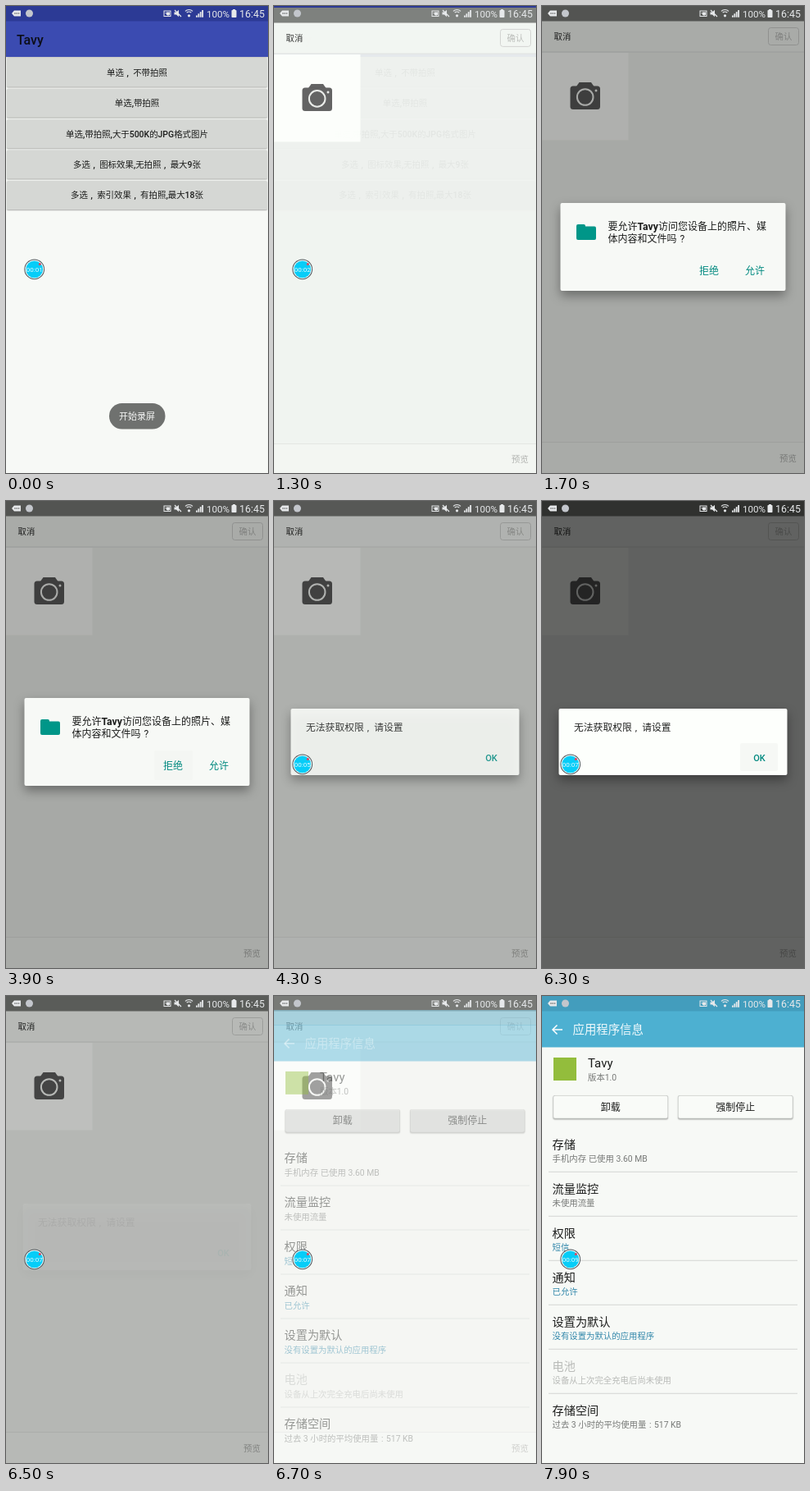
Recreate the animation shown at these times as an HTML page with a canvas. Size 320 by 569 pixels, loop 8000 ms.

```html
<!DOCTYPE html>
<html lang="zh-CN">
<head>
<meta charset="utf-8">
<style>
  html, body { margin: 0; width: 100%; height: 100%; overflow: hidden; background: #f7f9f6; }
  canvas { display: block; width: 320px; height: 569px; }
</style>
</head>
<body>
<canvas id="stage"></canvas>
<script>
const W = 320, H = 569, LOOP = 8000, STEP = 100;
const APP = 'Tavy', PAPER = '#f7f9f6', TEAL = '#00897f';
const canvas = document.getElementById('stage');
const scale = window.devicePixelRatio || 1;
canvas.width = W * scale;
canvas.height = H * scale;
const c = canvas.getContext('2d');
c.scale(scale, scale);

// Linear interpolation through [time, value] pairs.
function track(t, keys) {
  if (t <= keys[0][0]) return keys[0][1];
  for (let i = 1; i < keys.length; i++) {
    const [t0, v0] = keys[i - 1], [t1, v1] = keys[i];
    if (t < t1) return v0 + (v1 - v0) * (t - t0) / (t1 - t0);
  }
  return keys[keys.length - 1][1];
}
const easeOut = p => 1 - (1 - p) ** 2;

function rect(x, y, w, h, fill, r = 0) {
  c.fillStyle = fill;
  c.beginPath();
  c.roundRect(x, y, w, h, r);
  c.fill();
}
function circle(x, y, r, fill) {
  c.fillStyle = fill;
  c.beginPath();
  c.arc(x, y, r, 0, 7);
  c.fill();
}
function shape(points, fill) {
  c.fillStyle = fill;
  c.beginPath();
  points.forEach(p => c.lineTo(...p));
  c.fill();
}
function line(points, color, width = 1) {
  c.strokeStyle = color;
  c.lineWidth = width;
  c.beginPath();
  points.forEach(p => c.lineTo(...p));
  c.stroke();
}
function shadowed(blur, dy, alpha, draw) {
  c.save();
  c.shadowColor = `rgba(0,0,0,${alpha})`;
  c.shadowBlur = blur * scale;
  c.shadowOffsetY = dy * scale;
  draw();
  c.restore();
}
// Wide punctuation is set centred in its cell.
const wide = { '，': '\u2004,\u2002', '？': '\u2004?', '：': '\u2004:\u2004' };
function text(str, x, y, size, color, weight = 400, align = 'left') {
  c.font = `${weight} ${size}px Roboto, "Noto Sans CJK SC", "Noto Sans CJK", sans-serif`;
  c.textAlign = align;
  c.fillStyle = color;
  str = str.replace(/[，？：]/g, m => wide[m]);
  c.fillText(str, x, y);
  return c.measureText(str).width;
}
function layer(alpha, dy, draw) {
  if (alpha <= 0) return;
  c.save();
  c.globalAlpha = alpha;
  c.translate(0, dy);
  draw();
  c.restore();
}

function home(t) {
  rect(0, 0, W, H, PAPER);
  shadowed(3, 1, .3, () => rect(0, 18, W, 44, '#3b4bb1'));
  rect(0, 0, W, 18.5, '#2c3a95');
  text(APP, 13, 46.5, 16, '#0c0e18', 500);
  ['单选，不带拍照', '单选,带拍照', '单选,带拍照,大于500K的JPG格式图片',
   '多选，图标效果,无拍照，最大9张', '多选，索引效果，有拍照,最大18张'].forEach((label, i) => {
    const y = 63.5 + i * 37.35;
    const pressed = i === 4 && t >= 1000;
    shadowed(1.5, 1, .3, () => rect(1, y, 318, 35, pressed ? '#c4c6c3' : '#d5d7d4', 1.5));
    text(label, 160, y + 21.5, 10.45, '#1a1b1a', 500, 'center');
  });
  layer(track(t, [[400, 1], [800, 0]]), 0, () => {
    rect(126, 484, 68.5, 31.5, '#6f716f', 15.7);
    text('开始录屏', 160, 504, 11, '#f4f5f4', 400, 'center');
  });
}

function picker() {
  rect(0, 0, W, H, '#f1f4f0');
  rect(0, 18, W, 38, '#f4f7f3');
  rect(0, 0, W, 18.5, '#787a77');
  rect(0, 55.5, W, 1, '#e0e2df');
  text('取消', 14.5, 41, 10.4, '#2a2b2a', 500);
  c.strokeStyle = '#d0d2cf';
  c.lineWidth = 1;
  c.beginPath();
  c.roundRect(276.5, 26.5, 37, 21, 3);
  c.stroke();
  text('确认', 295, 41, 10.4, '#b9bbb8', 400, 'center');

  rect(0, 57, 105.5, 106.5, '#fdfffc');
  const ink = '#5a5a5a';
  rect(34.5, 97.5, 36.5, 28.5, ink, 3.5);
  shape([[42, 98], [45.5, 93], [60, 93], [63.5, 98]], ink);
  c.strokeStyle = '#f4f6f3';
  c.lineWidth = 2;
  c.beginPath();
  c.arc(52.7, 111, 9.8, 0, 7);
  c.stroke();
  circle(66, 103, 1.5, '#f4f6f3');

  rect(0, 531, W, 38, '#f4f7f3');
  rect(0, 531, W, 1, '#e4e6e3');
  text('预览', 290, 554.5, 10.4, '#adafac');
}

function permissionDialog(t) {
  shadowed(13, 6, .36, () => rect(22.5, 240, 275, 107, PAPER, 2));
  if (t >= 3900) rect(181, 304, 47, 36, t > 3900 ? '#e9ebe8' : '#f4f6f3', 2);
  rect(42, 266, 11, 8, '#009688', 2);
  rect(42, 268.5, 24, 16.5, '#009688', 2);
  let x = 80.5;
  x += text('要允许', x, 272.5, 12, '#1c1d1c');
  x += text(APP, x, 272.5, 12.3, '#1c1d1c', 700);
  text('访问您设备上的照片、媒', x, 272.5, 12, '#1c1d1c');
  text('体内容和文件吗？', 80.5, 287.7, 12, '#1c1d1c');
  text('拒绝', 192, 327, 12, TEAL, 500);
  text('允许', 248, 327, 12, TEAL, 500);
}

function settingsDialog(t) {
  shadowed(13, 6, .36, () => rect(20.5, 253, 279, 81, '#fdfffc', 2));
  if (t >= 6200 && t < 6500) rect(242, 295, 46, 34, '#f6f8f5', 2);
  text('无法获取权限，请设置', 39, 280, 11.8, '#222322');
  text('OK', 265.5, 316.8, 11, TEAL, 500, 'center');
}

function appInfo() {
  const blue = '#3388ab', grey = '#777977', faded = '#b9bbb8';
  rect(0, 0, W, H, PAPER);
  rect(0, 18, W, 44.5, '#4db0d1');
  rect(0, 0, W, 18.5, '#439dbd');
  line([[25, 41], [13.5, 41]], '#fff', 1.5);
  line([[18.5, 35.5], [13, 41], [18.5, 46.5]], '#fff', 1.5);
  text('应用程序信息', 37.5, 46.2, 14.4, '#f2fafc');
  rect(14, 75, 28, 28, '#93bd3c');
  text(APP, 56, 87.3, 15, '#1c1d1c');
  text('版本1.0', 56, 103, 10.4, grey);
  [['卸载', 13.5], ['强制停止', 166]].forEach(([label, x]) => {
    shadowed(1.5, 1, .35, () => rect(x, 121, 140.5, 28.5, '#cccecb', 2));
    rect(x + .7, 121.7, 139.1, 27.1, '#f9fbf8', 2);
    text(label, x + 70.2, 139.5, 12, '#1c1d1c', 500, 'center');
  });
  [['存储', '手机内存 已使用 3.60 MB', grey], ['流量监控', '未使用流量', grey],
   ['权限', '短信', blue], ['通知', '已允许', blue],
   ['设置为默认', '没有设置为默认的应用程序', blue],
   ['电池', '设备从上次完全充电后尚未使用', faded],
   ['存储空间', '过去 3 小时的平均使用量：517 KB', grey]].forEach(([title, note, color], i) => {
    const y = 180 + i * 54;
    text(title, 12.5, y + 5.5, 14.2, color === faded ? faded : '#1c1d1c');
    text(note, 12.5, y + 21.7, 10.4, color);
    if (i < 6) rect(8, y + 33.7, 304, 1, '#d3d5d2');
  });
}

function statusIcons() {
  const ink = '#e6e8ea';
  shape([[7, 9], [10, 5.5], [18, 5.5], [18, 12.5], [10, 12.5]], ink);
  [11, 13.3, 15.6].forEach(x => circle(x, 9, .8, '#555'));
  circle(28.5, 9, 4.5, '#c3c6cc');

  c.strokeStyle = ink;
  c.lineWidth = 1;
  c.strokeRect(193, 6, 8, 6.5);
  rect(196, 7.5, 4, 3.5, ink);
  line([[194.5, 8], [198.5, 12]], ink);
  shape([[205.5, 7.5], [208, 7.5], [211, 4.8], [211, 13.2], [208, 10.5], [205.5, 10.5]], ink);
  line([[206, 5], [214, 13]], ink, 1.2);
  [6.5, 4].forEach(r => {
    c.lineWidth = 1.2;
    c.beginPath();
    c.arc(223.5, 11, r, -2.35, -.8);
    c.stroke();
  });
  circle(223.5, 11.8, 1.6, ink);
  for (let i = 0; i < 4; i++) rect(232 + i * 2.4, 11.5 - i * 2.2, 1.8, 2.2 + i * 2.2, ink);
  text('100%', 245, 13.7, 11.6, ink);
  rect(275.5, 5, 6, 9, ink, .8);
  rect(277, 4, 3, 1.5, ink);
  text('16:45', 285, 13.9, 12.4, ink);
}

function recorder(t) {
  circle(34.7, 320.8, 12.4, '#50565a');
  circle(34.7, 320.8, 11.4, '#f4fbfd');
  circle(34.7, 320.8, 10.4, '#06cdf8');
  text('00:0' + (Math.floor((t + 100) / 1000) + 1), 34.7, 323.6, 8, '#e8fbff', 400, 'center');
  circle(41.3, 314.5, 1.5, '#e8455e');
}

function draw(t) {
  if (t < 1400) home(t);
  if (t >= 1100 && t < 7000) {
    const p = easeOut(track(t, [[1000, 0], [1400, 1]]));
    layer(p, 30 * (1 - p), picker);
  }
  const dim = track(t, [[1500, 0], [1700, .31], [4100, .31], [4200, .22], [4300, .28],
                        [4500, .6], [6300, .6], [6500, .25], [6650, 0]]);
  if (dim) rect(0, 0, W, H, `rgba(0,0,0,${dim})`);
  layer(track(t, [[1500, 0], [1700, 1], [4000, 1], [4200, 0]]), 0, () => permissionDialog(t));
  layer(track(t, [[4200, 0], [4300, .87], [4400, 1], [6300, 1], [6400, .6], [6500, .07], [6550, 0]]), 0,
        () => settingsDialog(t));
  const p = easeOut(track(t, [[6600, 0], [7000, 1]]));
  layer(p, 30 * (1 - p), appInfo);
  statusIcons();
  if (t < 1600 || t >= 4200) recorder(t);
}

const start = performance.now();
function tick() {
  const t = (performance.now() - start) % LOOP;
  draw(Math.floor(t / STEP) * STEP);
  requestAnimationFrame(tick);
}
tick();
</script>
</body>
</html>
```
